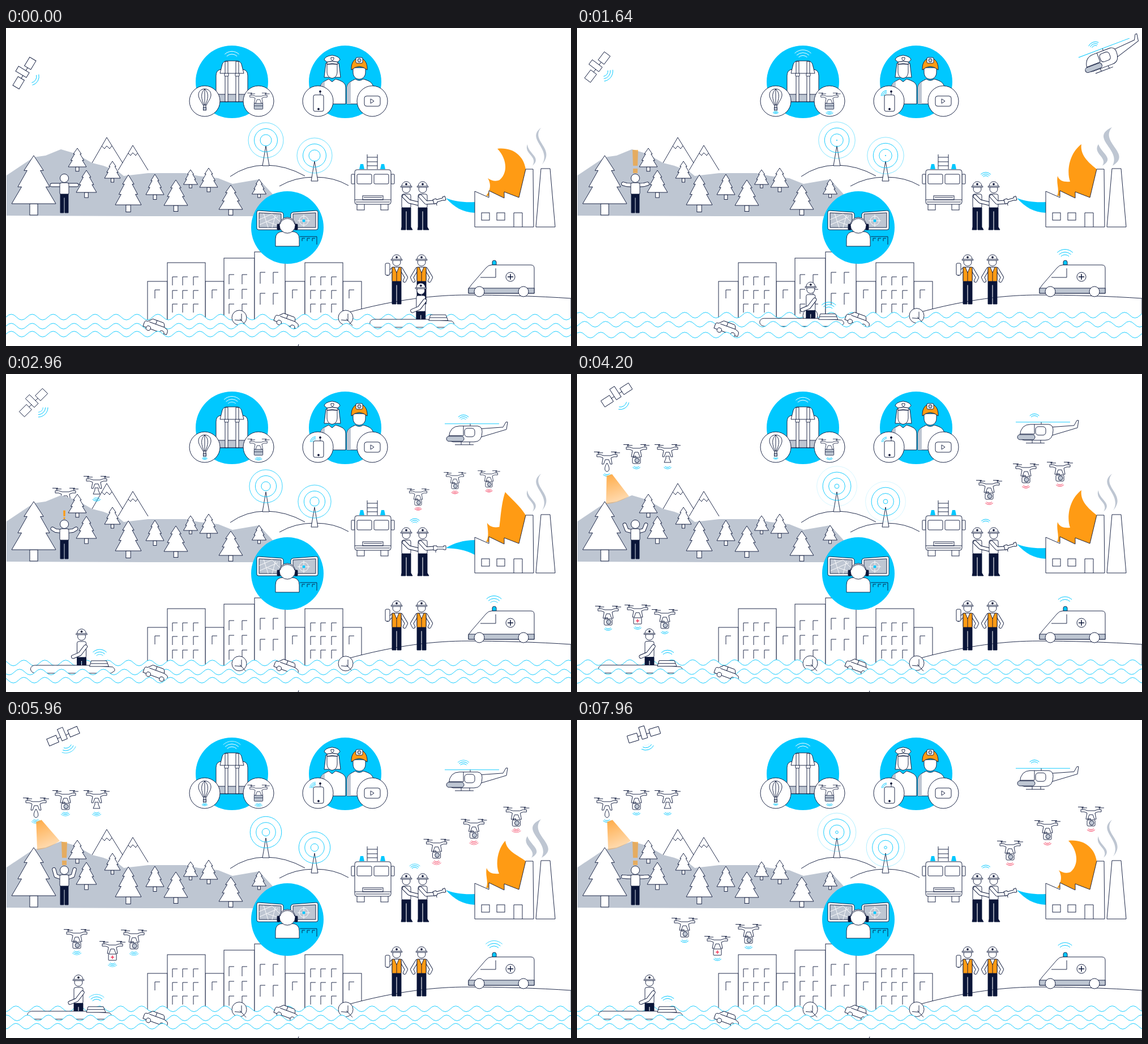
These frames come from a looping animation (998x561 px, 8 s). An HTML page:

```html
<!DOCTYPE html>
<html lang="en">
<head>
<meta charset="utf-8">
<title>Emergency network</title>
<style>
html,body{margin:0;width:100%;height:100%;overflow:hidden;background:#fff}
svg{display:block;width:998px;height:561px}
.l{fill:none}
.g{fill:#bec6d2}
.n{fill:#0a1538}
.c{fill:#00c8ff;stroke:none}
.o{fill:#ff9b14}
.x{stroke:none}
.w{fill:none;stroke-width:1}
.w path{vector-effect:non-scaling-stroke}
</style>
</head>
<body>
<svg viewBox="0 0 998 561"><g id="stage" fill="#fff" stroke="#0a1538" stroke-width=".9"></g></svg>
<script>
const CYAN = '#00c8ff', RED = '#f5385a', LOOP = 8000;
const $ = id => document.getElementById(id);

// Drawing helpers
const path = (d, cls = '', more = '') => `<path class="${cls}" d="${d}" ${more}/>`;
const rect = (x, y, w, h, rx = 0, cls = '') => `<rect class="${cls}" x="${x}" y="${y}" width="${w}" height="${h}" rx="${rx}"/>`;
const disc = (x, y, r, cls = '') => `<circle class="${cls}" cx="${x}" cy="${y}" r="${r}"/>`;
const group = (id, body, more = '') => `<g ${id ? `id="${id}"` : ''} ${more}>${body}</g>`;
const move = (x, y, body, more = '') => group('', body, `transform="translate(${x} ${y}) ${more}"`);
const limb = (d, w = 7) => {
  const ends = 'stroke-linecap="round" stroke-linejoin="round"';
  return path(d, 'l', `stroke-width="${w}" ${ends}`) + path(d, 'l', `stroke="#fff" stroke-width="${w - 1.8}" ${ends}`);
};
const waves = (x, y, rot, max, from = 400, col = CYAN) =>
  `<g class="w" stroke="${col}" data-max="${max}" data-from="${from}" transform="translate(${x} ${y}) rotate(${rot})">` +
  path('M-.7-.7A1 1 0 0 1 .7-.7').repeat(3) + '</g>';

const tree = (x, y, w, h) => {
  const side = s => [[.44, .31], [.3, .31], [.72, .65], [.55, .65], [1, 1]].map(([a, b]) => [x + s * a * w, y + b * h]);
  return rect(x - w * .18, y + h, w * .36, h * .235) + path('M' + [[x, y], ...side(1), ...side(-1).reverse()].join('L') + 'Z');
};
const windows = (xs, ys, h = 15) => ys.map(y => xs.map(x => path(`M${x} ${y + h}V${y}h9`, 'l')).join('')).join('');
const house = (x, y, w) => rect(x, y, w, 520 - y);

const hat = path('M-8-4C-8-16 8-16 8-4Z') + rect(-10, -5, 20, 2, 1) + disc(0, -8.500, 1.5, 'n');
const man = (x, y, torso, legs, extra = '') => move(x, y,
  rect(-8, 9, 16, torso - 8, 3) + path(`M-8 ${torso}H8V${legs}H1V${torso + 6}H-1V${legs}H-8Z`, 'n') +
  extra + disc(0, 0, 7) + hat);
const shoes = (x, y) => path(`M${x - 8} ${y}h7v5h-8zM${x + 1} ${y}h7l3 5h-10z`, 'n');

const loads = {
  cam: rect(-7, 14, 14, 11, 2) + rect(-5, 12, 4, 2) + disc(1, 19.5, 4, 'g'),
  kit: rect(-7, 14, 14, 11, 1) + path('M0 16.500V22.500M-3 19.500H3', 'l', `stroke="${RED}" stroke-width="1.500"`),
  horn: path('M-3 12H3V16L6 23H-6L-3 16Z'),
  lamp: path('M0 11C-6 20-4 26 0 26S6 20 0 11Z'),
  crate: rect(-9, 13, 18, 12, 1, 'g') + path('M-9 18H9', 'l')
};
const drone = (load, col, from) =>
  path('M-15-9V-4M15-9V-4M-23-8.500h10M-17-7h10M7-8.500h10M13-7h10', 'l') +
  path('M-18-4H-12L-6-2H6L12-4H18V0H12L7 2L9 13H6L3 5H-3L-6 13H-9L-7 2L-12 0H-18Z') +
  loads[load] + waves(0, 25, 180, 12, from, col);

const tower = (id, x, y) => path(`M${x - 6} ${y + 45}L${x} ${y + 10}L${x + 6} ${y + 45}Z`) +
  group(id, disc(x, y, 1).repeat(4), `class="l rings" stroke="${CYAN}"`);

const car = path('M-22 7V-1Q-22-4-17-4L-10-11H10Q12-11 14-4L20-2Q23 0 22 7Z') + path('M-14-4H14M-2-11V-4', 'l') +
  disc(-12, 7, 4) + disc(13, 7, 4);
const floatTree = disc(0, 0, 13) + path('M12 14L1 2M-8 4L4 5M4-7L4 5', 'l');
const HALF = 18.5;
const waterRow = id => path(`M-74 0q${HALF / 2}-10 ${HALF} 0` + `t${HALF} 0`.repeat(65) + 'V90H-74Z', '', `id="${id}" stroke="${CYAN}"`);

// Scene parts
const satellite = group('sat', rect(-29, -6.5, 18, 13) + rect(11, -6.5, 18, 13) + path('M-11 0H-5M5 0H11', 'l') +
  rect(-5, -15, 10, 22) + waves(0, 12, 180, 20, -1));

const backpack = disc(399, 95, 64, 'c') + waves(399, 59, 0, 23, -1, '#fff') +
  path('M371 130V84Q371 74 380 73H418Q427 74 427 84V130Z') + rect(371, 117, 56, 13, 0, 'g') +
  path('M378 80L382 64Q384 58 391 58H407Q414 58 416 64L420 80Z') +
  rect(387, 59, 5, 71) + rect(406, 59, 5, 71) + rect(386, 80, 7, 5, 1) + rect(405, 80, 7, 5, 1) +
  disc(351, 129, 27) + path('M348 136C344 128 340 124 340 118C340 104 362 104 362 118C362 124 358 128 354 136Z') +
  path('M351 108V136M351 108C343 114 345 126 350 136M351 108C359 114 357 126 352 136M349 136V140M353 136V140', 'l') +
  rect(348.5, 140, 5, 5, 0, 'g') + waves(351, 144, 180, 8) +
  disc(446, 129, 27) + move(446, 122, drone('crate', CYAN, 400), 'scale(.85)');

const crew = disc(599, 95, 64, 'c') +
  path('M555 134V105C555 96 565 93 570 90L576 95L582 90C592 93 600 96 600 105V134Z') +
  path('M555 134V105Q556 97 563 94V134Z', 'g x') +
  path('M565 62H588L591 87H562Z') + path('M567 64V78C568 92 584 92 585 78V64Z') +
  path('M567 60Q576 57 586 60V64Q576 61 567 64Z') +
  path('M562 56Q563 50 576 48Q589 50 590 56L586 60Q576 57 567 60Z') + path('M574 52H579V55L576.500 58L574 55Z') +
  path('M602 134V105C602 96 612 93 617 90Q624 95 631 90C641 93 649 96 649 107V134Z') +
  path('M602 134V105Q603 98 609 95V134Z', 'g x') +
  path('M613 70V79C614 94 634 94 635 79V70Z') + path('M610 74C608 46 640 46 638 74Q624 62 610 74Z', 'o') +
  rect(618, 52, 12, 10, 2) + disc(624, 57, 3, 'g') +
  disc(551, 129, 27) + rect(543, 118, 18, 29, 3) + path('M555 118V114', 'l') + disc(555, 112, 1.5, 'n') +
  disc(552, 143, 1.5, 'n') + waves(547, 120, -45, 11) +
  disc(647, 129, 27) + rect(633, 120, 28, 18, 4) + path('M644 125V133L650 129Z');

const arms = limb('M0 0', 7);
const forest =
  path('M152 238L178 193L206 238M198 251L224 207L251 251M169 208L174 213L178 208L183 213L187 208M216 221L220 225L224 220L229 225L232 221', 'l') +
  group('f1', drone('lamp', CYAN, 4000)) + group('f2', drone('cam', CYAN, 3300)) + group('f3', drone('horn', CYAN, 2600)) +
  path('M1 260L49 228L70 225L97 214L124 222L152 238L172 243L198 253L208 261L251 256L317 256L340 261L375 265L400 275L447 267L470 292L500 332H250L1 331Z', 'g x') +
  path('M-5 14H5L22 60Q0 66-21 61Z', 'x', 'id="beam" fill="url(#glow)"') +
  [[126, 212, 16, 33], [188, 235, 14, 30], [142, 251, 18, 39], [216, 259, 23, 53], [263, 258, 16, 36], [300, 268, 21, 45],
   [326, 250, 12.5, 26], [358, 247, 16, 34], [397, 277, 21, 43], [447, 267, 12.5, 26], [49, 225, 39, 85]].map(a => tree(...a)).join('') +
  group('', arms, 'class="arm"') + group('', arms, 'class="arm" transform="translate(206 0) scale(-1 1)"') +
  rect(95, 273, 16, 21, 3) + path('M96 293H110V326H104V299H102V326H96Z', 'n') + disc(103, 265, 7.5) +
  group('alert', path('M-5-41H5L4-13H-4ZM-4-8H4V0H-4Z', 'o x'));

const hills = path('M396 262Q424 242 459 242T528 261') + tower('t1', 459, 198) +
  path('M483 279Q510 263 545 263T605 278') + tower('t2', 545, 225);

const truck = path('M638 249V223M656 249V223M638 228H656M638 236H656M638 243H656', 'l') +
  path('M626 240H631L633 249H624ZM663 240H668L670 249H661Z', 'c') +
  rect(610, 258, 6, 17, 1) + rect(680, 258, 6, 17, 1) + rect(620, 308, 13, 13) + rect(662, 308, 13, 13) +
  rect(616, 250, 64, 61, 4) + rect(620, 258, 26, 17, 2) + rect(650, 258, 26, 17, 2) +
  rect(630, 296, 36, 7) + path('M632 299H664', 'l') + path('M616 303H680M618 307H678', 'l');

const fireCrew = man(707, 284, 33, 67) + shoes(707, 351) + limb('M703 297L712 306L729 310') +
  man(736, 284, 33, 67) + shoes(736, 351) + limb('M732 297L742 308L757 307') +
  group('nozzle', path('M-2-4H4V-2H16V-4H20V3H16V2H4V4H-2ZM2 4V8')) + waves(722, 267, 0, 14, 700);

const factory = path('', 'c', 'id="water"') + path('', 'o x', 'id="flame"') + path('', 'g x', 'id="smoke"') +
  path('M828 351V288L853 299V287L880 300V289L906 299L918 249H931L932 351Z') + path('M945 248H961L970 351H936Z') +
  rect(840, 326, 14, 13) + rect(867, 326, 14, 13) + path('M897 351V326H912V351', 'l');

const heli = group('heli', path('M-48 0H48', 'l', `stroke="${CYAN}"`) + path('M-3 0V5M-19 31V37M-4 31V37M-30 37H3', 'l') +
  path('M13 9L55 6L60-3H63L61 10L14 24Z') + path('M-41 24Q-39 4-22 4H10Q18 5 18 14Q18 32 4 32H-33Q-40 31-41 24Z') +
  path('M-40 21H-15V4', 'l') + rect(-45, 22, 31, 9, 4.5, 'g') + rect(-13, 8, 18, 15, 5) + waves(-15, -3, 0, 15, 900));

const control = disc(497, 352, 64, 'c') +
  path('M446 322L487 325Q490 326 490 329V352Q490 355 487 356H446Q443 356 443 353V325Q443 322 446 322Z') +
  path('M447 326L486 328V352H447Z', 'g') +
  path('M548 322L507 325Q503 326 503 329V352Q503 355 506 356H548Q551 356 551 353V325Q551 322 548 322Z') +
  path('M547 326L507 328V352H547Z', 'g') +
  path('M447 338L470 328L484 342M455 327L463 352M448 347L480 333M470 352L476 330M462 342L486 350', 'l', 'stroke="#fff"') +
  group('', disc(526, 340, 8, 'l') + path('M526 329V351M515 340H537', 'l'), 'stroke="#fff"') + disc(526, 340, 2.5, 'c') +
  path('M476 385V372Q476 359 490 359H504Q518 359 518 372V385Z') + rect(479, 346, 5, 10, 1, 'n') + rect(510, 346, 5, 10, 1, 'n') +
  disc(497, 348, 14) + path('M484 346A13.500 13.500 0 0 1 510 346', 'l') +
  path('M519 368H549V382M523 376V371H528M532 376V371H537M541 376V371H546', 'l');

const city = house(250, 447, 35) + house(352, 447, 33) + house(385, 406, 54) + house(285, 414, 67) +
  house(493, 447, 35) + house(439, 395, 54) + house(595, 447, 33) + house(528, 414, 67) +
  windows([263, 364, 506, 606], [462]) + windows([294, 312, 331, 538, 556, 575], [439, 463, 487]) +
  windows([394, 417], [435, 461, 487], 17) + windows([449, 472], [431, 468], 20);

const vest = path('M-8 9H-4L0 19L4 9H8V34H-8Z', 'o') + path('M0 19V34', 'l');
const rescue = path('M600 503C690 478 760 471 815 471S940 473 998 477V530H600Z') +
  limb('M683 425L674 434L674 418', 6) + rect(670, 415, 8, 21, 2) + limb('M698 425L707 440L704 446', 6) + man(690, 413, 34, 74, vest) +
  limb('M726 425L717 440L720 446', 6) + limb('M742 425L751 440L748 446', 6) + man(734, 413, 34, 74, vest) +
  path('M859 418V413Q859 410 862.500 410T866 413V418Z', 'c', 'style="stroke:#0a1538"') +
  path('M817 468V460L822 453L848 423Q852 418 858 418H927Q933 418 933 424V468Z') + rect(817, 459, 116, 9, 0, 'g') +
  path('M838 440H865V424', 'l') + disc(836, 465, 9) + disc(914, 465, 9) + disc(891, 439, 8) +
  path('M891 434V444M886 439H896', 'l', 'stroke-width="1.500"') + waves(862, 410, 0, 22, 700);

const boat = group('boat', man(90, 0, 37, 54) + limb('M97 18L87 31L75 36') +
  path('M10 65C-3 65-3 51 8 51H100L145 54Q150 58 148 61L142 65Z') + path('M104 53L107 43H134L138 53Z') + path('M106 48H136', 'l') +
  waves(122, 40, 0, 20, 900));

const fireDrones = ['r1', 'r2', 'r3'].map(id => group(id, drone('cam', RED, 2700))).join('');
const boatDrones = [['b1', 'cam'], ['b2', 'kit'], ['b3', 'cam']].map(([id, load]) => group(id, drone(load, CYAN, 3800))).join('');

$('stage').innerHTML =
  '<defs><linearGradient id="glow" x2="0" y2="1"><stop stop-color="#ffa53a" stop-opacity=".9"/><stop offset="1" stop-color="#ffa53a" stop-opacity=".4"/></linearGradient></defs>' +
  satellite + backpack + crew + forest + hills + truck + factory + fireCrew + fireDrones + heli + city + control + rescue +
  waterRow('row1') + group('ft1', floatTree) + group('ft2', floatTree) + group('car2', car) + boat +
  waterRow('row2') + group('car1', car) + waterRow('row3') + path('M517 0L516 3', 'l', 'id="twig"') + boatDrones;

// Motion helpers
const ramp = (t, a, b) => { const u = Math.min(1, Math.max(0, (t - a) / (b - a))); return u * u * (3 - 2 * u); };
const wave = (t, period) => Math.cos(2 * Math.PI * t / period);
const set = (id, name, v) => $(id).setAttribute(name, v);
const place = (id, x, y, a = 0, s = 1) => set(id, 'transform', `translate(${x} ${y}) rotate(${a}) scale(${s})`);
const mix = (a, b, w) => {
  const to = b.match(/-?[\d.]+/g);
  let i = 0;
  return a.replace(/-?[\d.]+/g, n => (+n + (to[i++] - n) * w).toFixed(2));
};
// Monotone cubic through the given times and values
function track(t, ts, vs) {
  const last = ts.length - 1;
  if (t <= ts[0]) return vs[0];
  if (t >= ts[last]) return vs[last];
  const i = ts.findIndex(x => x > t) - 1;
  const rate = k => (vs[k + 1] - vs[k]) / (ts[k + 1] - ts[k]);
  const slope = k => {
    if (k < 1 || k >= last) return 0;
    const a = rate(k - 1), b = rate(k);
    return a * b <= 0 ? 0 : 2 * a * b / (a + b);
  };
  const h = ts[i + 1] - ts[i], u = (t - ts[i]) / h, v = 1 - u;
  return vs[i] * (1 + 2 * u) * v * v + slope(i) * h * u * v * v + vs[i + 1] * u * u * (3 - 2 * u) - slope(i + 1) * h * u * u * v;
}

const SHAPES = {
  water: ['M777 300C792 306 810 308 828 307L828 326C806 325 792 316 777 300Z', 'M777 307C792 298 808 293 828 293L828 319C812 310 795 308 777 307Z'],
  flame: ['M868 213C894 210 914 224 918 249L908 302L848 296C855 288 858 276 851 265C858 270 866 271 872 268C886 256 886 232 868 213Z',
          'M891 205C888 224 904 238 918 249L908 302L848 296C853 286 846 274 849 261C852 270 860 272 871 271C865 255 868 222 891 205Z'],
  lowFlame: 'M882 213C884 232 904 238 918 249L908 302L848 296C853 286 846 274 849 261C852 270 860 272 871 271C864 255 868 228 882 213Z',
  smoke: ['M921 205C914 222 940 226 930 243C947 228 922 222 921 205ZM945 176C918 196 964 212 947 241C972 212 926 200 945 176Z',
          'M921 205C910 222 938 228 928 243C950 230 927 222 921 205ZM945 175C904 194 962 214 946 243C982 222 922 202 945 175Z'],
  arm: ['M97 277L88 277L81 277', 'M97 278L88 275L85 263']
};
const SAT = [-400, 0, 1640, 2960, 4200, 5960, 7080, 7960];
const MARKS = [0, 1640, 2960, 4200, 5960, 7080, 7960];
const FLEET = [3300, 4200, 5960, 7080, 7960];
const waveSets = [...document.querySelectorAll('.w')], ringSets = [...document.querySelectorAll('.rings')];
const armPaths = document.querySelectorAll('.arm path');

function render(t) {
  const beat = t % 2000, bob = wave(t, 1011);

  place('sat', track(t, SAT, [32, 32.5, 36, 48.5, 70, 101, 115, 118]), track(t, SAT, [82, 79.5, 69, 50.5, 37, 28.5, 27, 26]),
    track(t, SAT, [-60, -59, -53, -45, -33, -23, -18.5, -17]));

  const hover = 1.8 * wave(t - 5960, 746) * ramp(t, 2400, 2960);
  place('heli', 823 + track(t, [500, 1640, 2600, 2960], [250, 108, 8, 0]),
    86 + hover + track(t, [500, 1640, 2600, 2960], [-130, -51, -4, 0]), track(t, [1500, 1640, 2700], [-21, -20.7, 0]));

  // Forest
  place('f1', 53, track(t, [2700, 4100], [262, 146]));
  place('beam', 53, 165, -(2.5 + 18.5 * wave(t, 2000)));
  set('beam', 'opacity', ramp(t, 3850, 4150));
  place('f2', 105, track(t, [2400, 2960, 3900], [268, 210, 133]));
  place('f3', 160, track(t, [2200, 2960, 3700], [268, 189, 133]));
  const arm = mix(...SHAPES.arm, (1 - wave(t, LOOP / 14)) / 2);
  armPaths.forEach(p => p.setAttribute('d', arm));
  const grow = ramp(beat, 1120, 1500);
  place('alert', 103, 256, 0, .37 + .63 * grow);
  set('alert', 'opacity', beat > 850 ? 1 - .4 * grow : 0);

  // Fire
  const lift = ramp(beat, 600, 900) - ramp(beat, 1150, 1450);
  set('water', 'd', mix(...SHAPES.water, lift));
  place('nozzle', 757, 306 + lift, -16 * (1 - lift));
  const flame = mix(...SHAPES.flame, track(t, MARKS, [0, 1, .6, 1, 1, 1, 0]));
  set('flame', 'd', mix(flame, SHAPES.lowFlame, track(t, MARKS, [0, 0, 0, 0, 1, 1, 0])));
  set('smoke', 'd', mix(...SHAPES.smoke, track(t, MARKS, [0, 1, 0, 0, 1, 1, 0])));
  const go = track(t, [4200, 5960, 7080], [0, .88, 1]), rise = track(t, [2300, 2960, 4000], [28, 14, 0]);
  const size = track(t, [2300, 2960, 3400], [0, .86, 1]);
  [[728, 196, 37, 26], [793, 167, 38, 19], [853, 164, 55, -2]].forEach(([x, y, dx, dy], i) =>
    place('r' + (i + 1), x + dx * go, y + dy * go + rise, 0, size));

  // Water
  [508, 524, 541].forEach((y, i) =>
    place('row' + (i + 1), (i % 2 ? -1 : 1) * (t * .02 % (2 * HALF)), y + [2, 2, -1][i] * bob));
  place('ft1', 412, 509 + 2 * bob);
  place('ft2', 600, 509 + 2 * bob);
  place('car1', 265, 529 - 2 * bob, 20);
  place('car2', 496, 516 + bob, 20);
  place('twig', 0, 560 - 2 * bob);
  place('boat', track(t, [-400, 0, 1640, 2800, 3200], [720, 643, 323, 52, 38]), 462 + bob);
  const pop = ramp(t, 3300, 4000);
  [[[55, 55, 125, 178, 190], [450, 418, 378, 362, 358]],
   [[107, 107, 188, 237, 248], [450, 416, 399, 392, 390]],
   [[155, 155, 226, 288, 303], [450, 424, 379, 372, 369]]].forEach(([xs, ys], i) =>
    place('b' + (i + 1), track(t, FLEET, xs), track(t, FLEET, ys), 0, pop));

  // Signals
  for (const g of waveSets) {
    const { max, from } = g.dataset;
    [...g.children].forEach((p, i) => {
      const u = (t / 1400 + i / 3) % 1;
      p.setAttribute('transform', `scale(${max * (.35 + .65 * u)})`);
      p.setAttribute('opacity', t < from ? 0 : Math.min(1, u * 7, (1 - u) * 10));
    });
  }
  for (const g of ringSets) [...g.children].forEach((c, k) => {
    const r = ((t / 775 + .95) % 1 + k) * 10.5;
    c.setAttribute('r', r);
    c.setAttribute('opacity', Math.max(0, Math.min(1, (37 - r) / 9)));
  });
}

const start = performance.now();
function tick() {
  render((performance.now() - start) % LOOP);
  requestAnimationFrame(tick);
}
tick();
</script>
</body>
</html>
```
